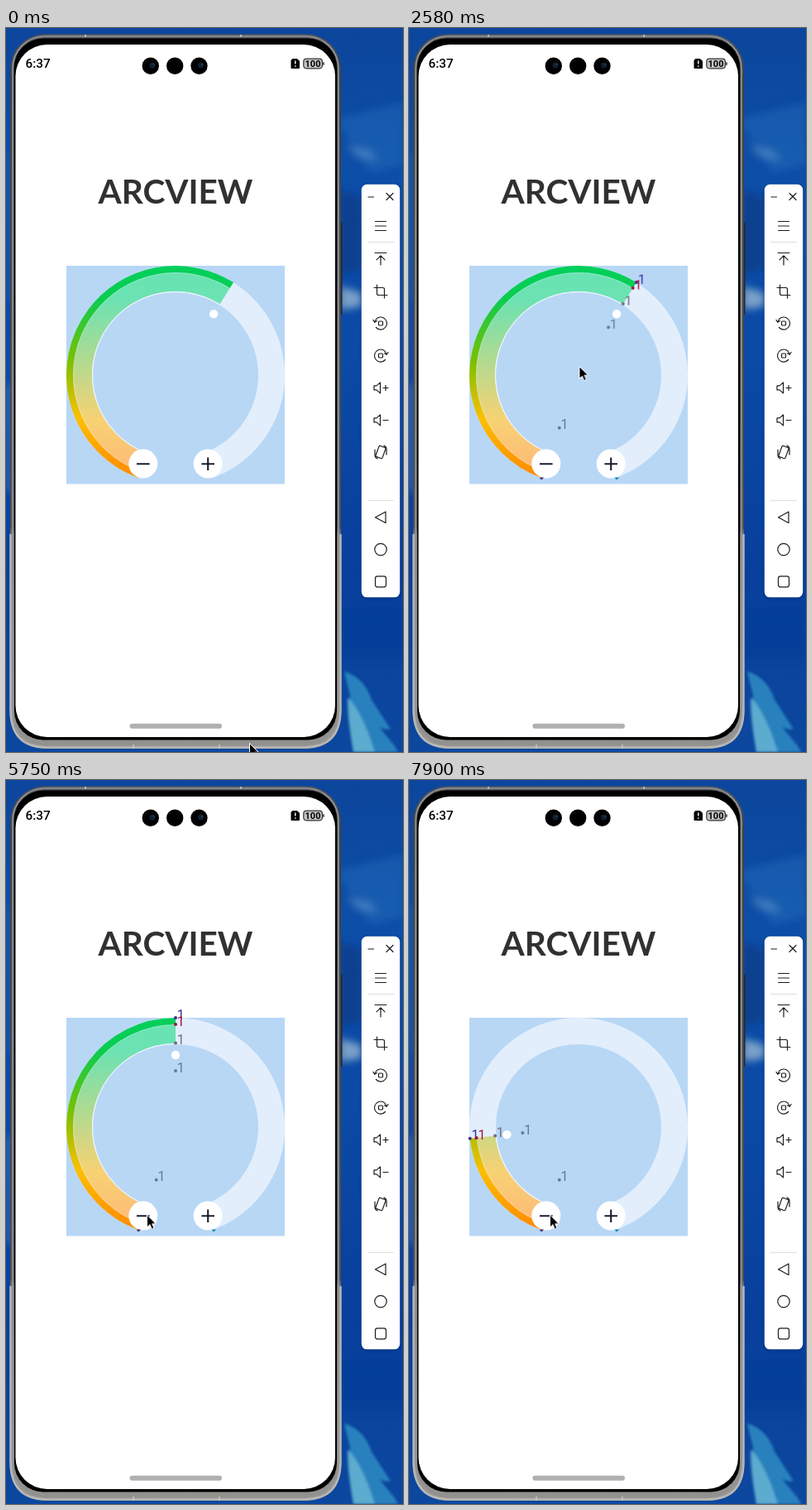
Write an HTML page that moves like this. It is 480x874 px and loops after 8 s.

```html
<!DOCTYPE html>
<html lang="en">
<head>
<meta charset="utf-8">
<title>Arc dial</title>
<style>
@property --a { syntax: "<number>"; inherits: true; initial-value: 32; }
html, body { margin: 0; width: 100%; height: 100%; overflow: hidden; background: #0b46a0; }
svg { display: block; width: 480px; height: 874px; }
text { font-family: Roboto, "Noto Sans", sans-serif; }
.title { font: 700 40.6px Lato, "Open Sans", sans-serif; fill: #303133; text-anchor: middle; }
.icons { fill: none; stroke: #1c1c1e; stroke-width: 1.2; stroke-linecap: round; stroke-linejoin: round; }

/* --a is the end angle of the arc in degrees from the top */
.dial { animation: dial 8s infinite; }
.fill { stroke-dasharray: 320 640; stroke-dashoffset: calc((160 - var(--a)) * 1px); }
.turn { transform: rotate(calc(var(--a) * 1deg)); }
.upright { transform: rotate(calc(var(--a) * -1deg)); }
.marks { animation: marks 8s step-end infinite; }
.cursor { animation: cursor 8s linear infinite; }
.marks text { font-size: 4.5px; font-weight: 700; opacity: .75; }

@keyframes dial {
  0%, 64.4% { --a: 32; animation-timing-function: cubic-bezier(.35, 0, .65, 1); }
  72% { --a: 0; }
  72.3% { --a: 0; animation-timing-function: cubic-bezier(.35, 0, .65, 1); }
  79.4% { --a: -32; }
  81.6% { --a: -32; animation-timing-function: cubic-bezier(.35, 0, .65, 1); }
  89.4% { --a: -64; }
  91.25% { --a: -64; animation-timing-function: cubic-bezier(.35, 0, .65, 1); }
  98.7%, 100% { --a: -96; }
}
@keyframes marks {
  0% { opacity: 0; }
  25%, 100% { opacity: 1; }
}
@keyframes cursor {
  0%, .4% { transform: translate(294px, 863px); }
  4.1%, 6% { transform: translate(293px, 858px); }
  10%, 11.9% { transform: translate(290px, 846px); }
  16.25% { transform: translate(279.4px, 753px); }
  22.25% { transform: translate(246px, 526px); animation-timing-function: ease-out; }
  32.25% { transform: translate(205.4px, 408px); }
  53.75% { transform: translate(205.4px, 408px); animation-timing-function: ease-in-out; }
  63.8%, 100% { transform: translate(170px, 524.5px); }
}
</style>
</head>
<body>
<svg viewBox="0 0 480 874">
  <defs>
    <linearGradient id="sea" x2="0" y2="1">
      <stop offset="0" stop-color="#0c469c"/>
      <stop offset=".2" stop-color="#0d4ea8"/>
      <stop offset=".45" stop-color="#0b4aa6"/>
      <stop offset=".75" stop-color="#083f9c"/>
      <stop offset="1" stop-color="#0c489f"/>
    </linearGradient>
    <linearGradient id="metal" x2="0" y2="1">
      <stop offset="0" stop-color="#55585d"/>
      <stop offset=".06" stop-color="#3f4145"/>
      <stop offset=".69" stop-color="#4e5054"/>
      <stop offset=".7" stop-color="#77767a"/>
      <stop offset="1" stop-color="#94928f"/>
    </linearGradient>
    <linearGradient id="vivid" gradientUnits="userSpaceOnUse" x1="0" y1="-132" x2="0" y2="125">
      <stop offset="0" stop-color="#00d05c"/>
      <stop offset=".16" stop-color="#0ccc4e"/>
      <stop offset=".45" stop-color="#7cc000"/>
      <stop offset=".72" stop-color="#fcbf00"/>
      <stop offset="1" stop-color="#ff8800"/>
    </linearGradient>
    <linearGradient id="pale" gradientUnits="userSpaceOnUse" x1="0" y1="-132" x2="0" y2="125">
      <stop offset="0" stop-color="#67e3b2"/>
      <stop offset=".16" stop-color="#6ce2b2"/>
      <stop offset=".45" stop-color="#b2da90"/>
      <stop offset=".72" stop-color="#f7d273"/>
      <stop offset="1" stop-color="#ffb678"/>
    </linearGradient>
    <filter id="soft" x="-50%" y="-50%" width="200%" height="200%"><feGaussianBlur stdDeviation="5"/></filter>
    <filter id="haze" x="-20%" y="-20%" width="140%" height="140%"><feGaussianBlur stdDeviation="1.5"/></filter>
    <g id="volume">
      <path d="M-8-2.600h3l4.500-4v13l-4.500-4h-3z"/>
      <path d="M3 0h6"/>
    </g>
    <g id="spin">
      <path d="M-7.300-1.600A7.500 7.500 0 1 1-5.600 5M-9-4l1.700 2.800 2.800-1.700"/>
      <rect x="-2.500" y="-2.500" width="5" height="5" rx="1"/>
    </g>
    <g id="dot"><circle r="2"/><text x="1.800" y="1.600">1</text></g>
  </defs>

  <!-- wallpaper -->
  <rect width="480" height="874" fill="url(#sea)"/>
  <g filter="url(#soft)">
    <path d="M398 110L480 90V165L440 175Z" fill="#2c79c4" opacity=".35"/>
    <path d="M410 142L440 148 450 160 425 156Z" fill="#8fc0dc" opacity=".35"/>
    <path d="M402 195L430 205V290L402 300Z" fill="#0c408f"/>
    <path d="M404 312L430 320V336L404 340Z" fill="#a9c6d6" opacity=".7"/>
    <path d="M0 150H6V330H0Z" fill="#2a6bb2" opacity=".5"/>
    <path d="M0 430H6V560H0Z" fill="#6c9bc8" opacity=".5"/>
    <path d="M400 700H480V760H400Z" fill="#0a3c95" opacity=".6"/>
  </g>
  <g filter="url(#haze)">
    <path d="M409 777C424 781 436 792 442 811C450 823 459 838 465 846C461 848 455 846 451 843C458 854 470 864 474 874H420C417 850 414 826 416 806C414 796 411 787 409 777Z" fill="#2f8cc2" opacity=".85"/>
    <path d="M413 808C424 818 436 842 446 874H420C416 850 412 828 413 808Z" fill="#74bfd8" opacity=".7"/>
  </g>

  <!-- phone -->
  <path d="M405 235V346" stroke="#25272b" stroke-width="3"/>
  <rect x="5" y="7.500" width="400" height="862.500" rx="42" fill="url(#metal)"/>
  <rect x="8" y="10" width="394" height="857" rx="39" fill="none" stroke="#96989a" stroke-width="1.600"/>
  <rect x="10" y="12.500" width="390" height="847" rx="35" fill="#000"/>
  <path d="M5.500 611V824Q6 868 48 868.500H362Q404 868 404.500 824V611" fill="none" stroke="#bab7b4" stroke-width="2.500"/>
  <path d="M96 8v3M284 8v3M154 865v5M258 865v5" stroke="#c8c8c8" stroke-width="1.500"/>
  <rect x="11.500" y="20" width="386.500" height="836" rx="38" fill="#fff"/>

  <!-- status bar -->
  <text x="23.500" y="48" font-size="15.300" font-weight="500">6:37</text>
  <g>
    <circle cx="174.800" cy="45.800" r="10.200"/>
    <circle cx="204.200" cy="45.800" r="10.200"/>
    <circle cx="233.500" cy="45.800" r="10.200"/>
    <g fill="#0d2034">
      <circle cx="177" cy="45" r="3.500"/>
      <circle cx="235.500" cy="45" r="3.500"/>
    </g>
    <g fill="#23496a">
      <circle cx="178.500" cy="43.800" r="1"/>
      <circle cx="237" cy="43.800" r="1"/>
    </g>
  </g>
  <path d="M346.500 37.500h5.500l2.500 2.500v8.500h-9.500v-9.500z" stroke="#000" stroke-linejoin="round"/>
  <path d="M349.800 39.500v4M349.800 45.300v1.400" stroke="#fff" stroke-width="1.400"/>
  <rect x="359.800" y="37.200" width="22.600" height="11.600" rx="3.500" fill="#c4c4c4" stroke="#333" stroke-width="1.200"/>
  <path d="M384 41.200v3.600" stroke="#333" stroke-width="1.500"/>
  <text x="371" y="47" font-size="11" font-weight="700" text-anchor="middle">100</text>

  <text class="title" x="205" y="211.700">ARCVIEW</text>
  <rect x="149.500" y="839.800" width="111.500" height="6" rx="3" fill="#b0b0b0"/>

  <!-- dial -->
  <rect x="73" y="287" width="264" height="263.500" fill="#b8d7f5"/>
  <g class="dial" transform="translate(205 419)">
    <g fill="none">
      <path d="M-39.700 109A116 116 0 1 1 39.700 109" stroke="#e2eefc" stroke-width="32"/>
      <path class="fill" pathLength="320" d="M-38.600 106A112.800 112.800 0 1 1 38.600 106" stroke="url(#pale)" stroke-width="23.500"/>
      <path class="fill" pathLength="320" d="M-43.800 120.300A128 128 0 1 1 43.800 120.300" stroke="url(#vivid)" stroke-width="8"/>
      <path class="fill" pathLength="320" d="M-34.400 94.400A100.500 100.500 0 1 1 34.400 94.400" stroke="#f2f7fb" stroke-width="1"/>
      <path class="fill" pathLength="320" d="M-42.200 115.800A123.300 123.300 0 1 1 42.200 115.800" stroke="#fff" stroke-opacity=".25"/>
    </g>
    <g fill="#fff">
      <circle class="turn" cy="-87" r="5.200"/>
      <circle cx="-39.200" cy="107" r="17.500"/>
      <circle cx="39.200" cy="107" r="17.500"/>
    </g>
    <path d="M-47 107.200h15.600M31.400 107.200h15.600M39.200 99.400v15.600" stroke="#1b1d30" stroke-width="2.100"/>
    <g class="marks">
      <g class="turn">
        <g transform="translate(0 -132)" fill="#3b2c9c"><use class="upright" href="#dot"/></g>
        <g transform="translate(0 -124)" fill="#a8123c"><use class="upright" href="#dot"/></g>
        <g transform="translate(0 -101.500)" fill="#6c6f80"><use class="upright" href="#dot"/></g>
        <g transform="translate(0 -68)" fill="#5f7d9b"><use class="upright" href="#dot"/></g>
      </g>
      <use href="#dot" transform="translate(-23.300 63.700)" fill="#5f7d9b"/>
      <path d="M-47 123.500h5l-2 2.500h-2z" fill="#4b3575"/>
      <path d="M44 123.500h5l-2 2.500h-2z" fill="#168fae"/>
    </g>
  </g>

  <!-- toolbar -->
  <rect x="429" y="189" width="48" height="500" rx="7" fill="#001a4d" opacity=".3" filter="url(#haze)"/>
  <rect x="429.800" y="188.800" width="46.400" height="498.500" rx="6.500" fill="#fff"/>
  <path d="M437 258.500h32M437 570.500h32" stroke="#dedede"/>
  <g class="icons">
    <path d="M438 204h6.500M460 199.500l8 8M468 199.500l-8 8"/>
    <path d="M446.500 233.500h13M446.500 239h13M446.500 244.500h13"/>
    <g transform="translate(453 279)"><path d="M-7-7.500h14M0 7v-11M-5 .8l5-5 5 5"/></g>
    <g transform="translate(453 318)"><path d="M-4.500-8v10.500q0 2 2 2h10.500M-8-4.500h10.500q2 0 2 2v10.500"/></g>
    <use href="#spin" transform="translate(453 356.500)"/>
    <use href="#spin" transform="translate(453 395.500) scale(-1 1)"/>
    <use href="#volume" transform="translate(453 434.500)"/>
    <path d="M459 431.500v6"/>
    <use href="#volume" transform="translate(453 473.500)"/>
    <g transform="translate(453 512)">
      <rect x="-4.300" y="-7" width="8.600" height="14" rx="1.500" transform="rotate(20)"/>
      <path d="M-7-3v6.500q0 3 3 4.500M7 3v-6.500q0-3-3-4.500"/>
    </g>
    <path d="M459 584v13.500L446.500 590.700Z"/>
    <circle cx="453" cy="629.500" r="7.200"/>
    <rect x="446.500" y="661.800" width="13" height="13" rx="2.500"/>
  </g>

  <path class="cursor" d="M.5.500V15.500L4 12.300 6.300 17.600 9 16.400 6.700 11.200H11.200Z" stroke="#fff" stroke-width="1"/>
</svg>
</body>
</html>
```
